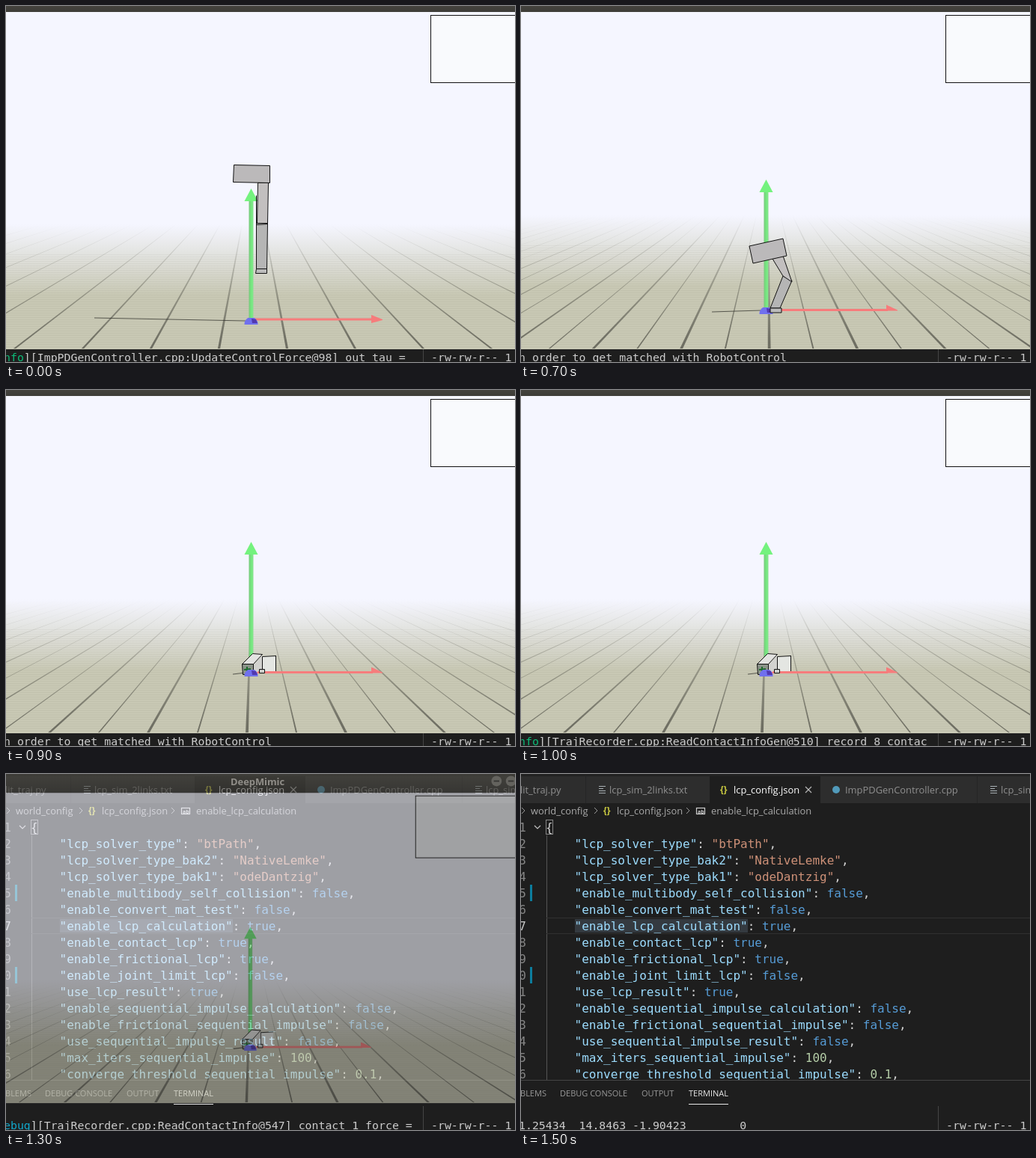
Animation, 680 px wide and 476 px high, one loop 1.6 s. Source, as an HTML page with a canvas:

```html
<!DOCTYPE html>
<html lang="en">
<head>
<meta charset="utf-8">
<style>
html, body { margin: 0; width: 100%; height: 100%; overflow: hidden; background: #1e1e1e }
canvas { display: block }
</style>
</head>
<body>
<canvas id="stage" width="680" height="476"></canvas>
<script>
const c = document.getElementById('stage').getContext('2d');
const MONO = '"DejaVu Sans Mono", monospace', SANS = '"Open Sans", sans-serif';
const CELL = 8.95;

function rect(x, y, w, h, fill) { c.fillStyle = fill; c.fillRect(x, y, w, h); }
function text(s, x, y, fill, font) { c.font = font; c.fillStyle = fill; c.fillText(s, x, y); }
function path(pts, close) {
  c.beginPath();
  for (let i = 0; i < pts.length; i += 2) c.lineTo(pts[i], pts[i + 1]);
  if (close) c.closePath();
}
function poly(fill, ...pts) { path(pts, true); c.fillStyle = fill; c.fill(); }
function line(color, width, ...pts) { path(pts); c.strokeStyle = color; c.lineWidth = width; c.stroke(); }
function solid(fill, ...pts) { poly(fill, ...pts); c.strokeStyle = '#111'; c.lineWidth = 1; c.stroke(); }
function disc(x, y, r, fill) { c.beginPath(); c.arc(x, y, r, 0, 7); c.fillStyle = fill; c.fill(); }
function fade(y0, y1, from, to) {
  const g = c.createLinearGradient(0, y0, 0, y1);
  g.addColorStop(0, from); g.addColorStop(1, to);
  return g;
}

// ---- editor ----
const CONFIG = [
  ['lcp_solver_type', '"btPath"'], ['lcp_solver_type_bak2', '"NativeLemke"'],
  ['lcp_solver_type_bak1', '"odeDantzig"'], ['enable_multibody_self_collision', 'false'],
  ['enable_convert_mat_test', 'false'], ['enable_lcp_calculation', 'true'],
  ['enable_contact_lcp', 'true'], ['enable_frictional_lcp', 'true'],
  ['enable_joint_limit_lcp', 'false'], ['use_lcp_result', 'true'],
  ['enable_sequential_impulse_calculation', 'false'], ['enable_frictional_sequential_impulse', 'false'],
  ['use_sequential_impulse_result', 'false'], ['max_iters_sequential_impulse', '100'],
  ['converge_threshold_sequential_impulse', '0.1']
];
const valueColor = v => v[0] === '"' ? '#ce9178' : /\d/.test(v) ? '#b5cea8' : '#569cd6';

function fileIcon(x, y) {
  for (let i = 0; i < 4; i++) rect(x, y + i * 3, i === 1 ? 6 : 9, 1, '#a8b0b4');
}

function drawEditor() {
  rect(0, 0, 680, 476, '#1e1e1e');
  rect(0, 0, 680, 39, '#2d2d2d');
  rect(0, 0, 680, 3, '#222');
  rect(252, 3, 148, 36, '#1e1e1e');
  for (const x of [86, 609]) rect(x, 3, 1, 36, '#252526');
  const ui = '12.9px ' + SANS, dim = '#8f8f8f';
  text('lit_traj.py', -1, 26, dim, ui);
  fileIcon(104, 16);
  text('lcp_sim_2links.txt', 118, 26, dim, ui);
  text('{}', 266, 25, '#cbcb41', 'bold 12px ' + SANS);
  text('lcp_config.json', 284, 26, '#fff', ui);
  line('#bbb', 1.1, 380, 17, 388, 25);
  line('#bbb', 1.1, 388, 17, 380, 25);
  disc(421, 21, 5, '#519aba');
  text('ImpPDGenController.cpp', 433, 26, dim, ui);
  fileIcon(627, 16);
  text('lcp_sim_2links', 641, 26, dim, ui);

  for (const x of [1, 98, 221]) line('#999', 1, x, 45, x + 4, 49, x, 53);
  text('world_config', 13, 54, '#a9a9a9', ui);
  text('{}', 110, 53, '#cbcb41', 'bold 12px ' + SANS);
  text('lcp_config.json', 128, 54, '#a9a9a9', ui);
  c.strokeStyle = '#ccc'; c.lineWidth = 1.2; c.strokeRect(234.5, 45.5, 11, 8);
  text('ab', 236, 53, '#ccc', 'bold 7px ' + SANS);
  text('enable_lcp_calculation', 254, 54, '#a9a9a9', ui);

  c.save();
  c.beginPath(); c.rect(0, 60, 680, 349); c.clip();
  rect(34, 82, 1, 330, '#555');
  rect(34, 192, 646, 1, '#303030');
  rect(34, 213, 646, 1, '#303030');
  rect(72, 194, 231, 18, '#343a40');
  line('#c5c5c5', 1.1, 18, 69, 22, 73, 26, 69);
  c.strokeStyle = '#888'; c.lineWidth = 1; c.strokeRect(33.5, 61.5, 9, 19);
  const code = '16px ' + MONO;
  text('{', 33, 77, '#d4d4d4', code);
  for (let n = 1; n <= 16; n++) {
    const y = 55 + 22 * n;
    c.textAlign = 'right';
    text(n, 7, y, n === 7 ? '#c6c6c6' : '#858585', code);
    c.textAlign = 'left';
    if (n % 5 === 0 && n < 15) rect(12, y - 17, 3, 22, '#0c7d9d');
    if (n === 1) continue;
    const [key, value] = CONFIG[n - 2];
    let x = 71.5;
    for (const [s, color] of [[`"${key}"`, '#9cdcfe'], [': ', '#d4d4d4'], [value, valueColor(value)], [',', '#d4d4d4']]) {
      text(s, x, y, color, code);
      x += c.measureText(s).width;
    }
  }
  c.restore();

  rect(0, 409, 680, 1, '#444');
  const tab = '11px ' + SANS;
  text('BLEMS', -1, 431, '#999', tab);
  text('DEBUG CONSOLE', 52, 431, '#999', tab);
  text('OUTPUT', 161, 431, '#999', tab);
  text('TERMINAL', 224, 431, '#e7e7e7', tab);
  rect(224, 441, 53, 1, '#e7e7e7');
}

function drawTerminal(output) {
  const font = '14.87px ' + MONO, tag = output.match(/^(nfo|ebug)?/)[0];
  text(tag, -3, 475, tag === 'nfo' ? '#0dbc79' : '#11a8cd', font);
  text(output.slice(tag.length), -3 + tag.length * CELL, 475, '#ccc', font);
  rect(557, 444, 1, 32, '#444');
  text('-rw-rw-r-- 1', 568, 475, '#ccc', font);
}

// ---- simulation window ----
function drawGround(base, high) {
  const top = high ? 292 : 280, vx = 330, vy = 213;
  const step = high ? 91 : 66 - (base - 379) / 4;
  const mid = high ? 375.5 : 322 + (base - 379) / 3;
  rect(-60, 8, 800, 451, '#f5f6ff');
  rect(-60, top, 800, 459 - top, fade(top, top + 95, 'rgba(200,200,180,0)', 'rgb(200,200,180)'));
  c.save();
  c.beginPath(); c.rect(-60, top, 800, 459 - top); c.clip();
  const ink = fade(top, 450, 'rgba(95,95,85,0)', 'rgba(95,95,85,.85)');
  for (let k = -16; k <= 16; k++) {
    const x = mid + k * step, w = high ? 1.6 : k % 2 ? 1 : 1.9;
    poly(ink, vx, vy, x - w, 458, x + w, 458);
  }
  for (let y = top + 40; y < 458; y += 3) rect(-60, y, 800, 1, 'rgba(110,110,90,.06)');
  c.restore();
}

function drawAxes(base, high) {
  const x = base === 391 ? 329 : 327.5, tip = base - (high ? 178 : 176);
  const red = high ? base - 3 : base - 1.5;
  const g = c.createLinearGradient(x - 3, 0, x + 3, 0);
  g.addColorStop(0, '#78c87c'); g.addColorStop(.6, '#74ec80'); g.addColorStop(1, '#8adf90');
  rect(x - 3, tip + 15, 6, 176 - 15, g);
  poly('#74f27e', x, tip, x + 9, tip + 17, x - 9, tip + 17);
  rect(330, red - 1.5, 160, 3, '#f67c7c');
  poly('#f67c7c', 488, red - (high ? 6 : 7), 503, red, 503, red + 1, 488, red + (high ? 5 : 1));
}

function drawOrigin(base) {
  c.save();
  c.beginPath(); c.rect(300, base - 5, 60, 9); c.clip();
  disc(327.5, base + 3, 9, '#7070ee');
  poly('#5138b0', 328, base - 4, 334, base - 3, 336, base + 2, 329, base + 2);
  c.restore();
}

const POSES = {
  stand(dy) {
    c.save();
    c.translate(.5, dy + .5);
    solid('#c2bfbf', 336, 236, 350, 236, 349, 290, 335, 290);
    solid('#b5b5b5', 334, 290, 349, 290, 348, 351, 334, 351);
    solid('#bbb', 334, 351, 348, 351, 348, 357, 333, 357);
    line('#111', 1, 334, 253, 334, 292, 349, 291);
    solid('#bbb9ba', 304, 212, 352, 213, 352, 236, 303, 235);
    c.restore();
  },
  bend() {
    solid('#b5b5b5', 333, 404, 346, 404, 362, 367, 350, 361);
    solid('#c2bfbf', 350, 361, 362, 369, 350, 334, 336, 338);
    solid('#bbb', 333, 404, 348, 404, 348, 410, 333, 410);
    solid('#bbb9ba', 305, 321, 350, 311, 355, 334, 310, 344);
  },
  fold() {
    solid('#e6e6e6', 331, 358, 349, 345, 365, 359, 347, 368);
    solid('#a9a9a9', 347, 368, 365, 359, 363, 367, 344, 381);
    solid('#858585', 313, 376, 315, 368, 333, 357, 343, 370, 334, 387, 325, 391, 314, 382);
    line('#111', 1, 315, 368, 328, 378, 345, 366);
    line('#111', 1, 328, 378, 325, 390);
    line('#111', 1, 349, 361, 338, 384);
    solid('#c4c4c4', 332, 385, 343, 384, 344, 391, 333, 391);
    disc(340.5, 358, 3.5, '#174c22');
    disc(340.5, 358, 1.8, '#4ab95a');
  },
  rest(open) {
    rect(342, 356, 19, 20, '#e4e6e2');
    line('#111', 1, 361, 355.5, 342.5, 356.5, 342.5, 373);
    if (open) line('#111', 1, 360.5, 356, 360.5, 376);
    solid('#e3e3e1', 315.5, 366.5, 329.5, 352.5, 342.5, 353.5, 330.5, 366.5);
    solid('#8b9389', 315.5, 366.5, 330.5, 366.5, 330.5, 380.5, 316.5, 380.5);
    poly('#d2d2cf', 331, 367, 342, 355, 342, 373, 331, 380);
    solid('#cfcfcc', 338.5, 373.5, 345.5, 373.5, 345.5, 378.5, 338.5, 378.5);
    line('#1b6b2b', 2, 318, 374, 327, 373);
    line('#1b6b2b', 2, 322, 370, 322, 378);
  }
};

function drawWindow({ base, pose, arg, shadow }) {
  const high = base === 422;
  drawGround(base, high);
  line('rgba(50,50,45,.75)', 1.2, shadow, base - (high ? 5 : -1), 320, base - 1);
  drawAxes(base, high);
  if (pose === 'rest') { POSES.rest(arg); drawOrigin(base); }
  else { drawOrigin(base); POSES[pose](arg); }
  rect(567, 12, 200, 91, '#111');
  rect(568, 13, 198, 89, '#f9fafd');
  rect(-60, -24, 800, 32, fade(-24, 8, '#55534b', '#3e3d38'));
  c.textAlign = 'center';
  text('DeepMimic', 338, -3, '#dfdbd2', 'bold 14px ' + SANS);
  c.textAlign = 'left';
  for (const x of [685, 706]) {
    disc(x, -9, 7.5, '#8a8880');
    rect(x - 4, -10, 8, 2, '#3c3b37');
  }
}

// ---- timeline ----
const CONTROL = 'nfo][ImpPDGenController.cpp:UpdateControlForce@98] out tau =';
const RECORD = 'nfo][TrajRecorder.cpp:ReadContactInfoGen@510] record 8 contac';
const CONTACT = 'ebug][TrajRecorder.cpp:ReadContactInfo@547] contact 1 force =';
const MATCHED = 'n order to get matched with RobotControl';
const ZEROS = '0 0 0 0 0 0 0 0 0 0 0 0';
const FORCE = '1.25434  14.8463 -1.90423        0';
const rest = (out, open, more) => ({ base: 379, pose: 'rest', arg: open, shadow: 303, out, ...more });
const STEPS = [
  { base: 422, pose: 'stand', arg: 0, shadow: 118, out: CONTROL },
  { base: 422, pose: 'stand', arg: 27, shadow: 150, out: MATCHED },
  { base: 422, pose: 'stand', arg: 58, shadow: 190, out: CONTROL },
  { base: 408, pose: 'bend', shadow: 255, out: MATCHED },
  { base: 391, pose: 'fold', shadow: 295, out: ZEROS },
  rest(MATCHED, true),
  rest(RECORD, true),
  rest(RECORD, false),
  rest(MATCHED, false),
  rest(CONTACT, false, { scale: .92, alpha: .6 }),
  rest(FORCE, false, { scale: .85, alpha: .18 }),
  { out: FORCE }
];

function draw(now) {
  const t = now % 1600;
  const step = STEPS[Math.max(0, Math.floor(t / 100) - 4)];
  drawEditor();
  drawTerminal(step.out);
  if (step.pose) {
    const { scale = 1, alpha = 1 } = step;
    c.save();
    c.translate(314 * (1 - scale), 222 * (1 - scale));
    c.scale(scale, scale);
    if (alpha < 1) drawFaded(step, alpha);
    else drawWindow(step);
    c.restore();
  }
  requestAnimationFrame(draw);
}

// Blend the finished window as one layer by laying the editor back over it.
const layer = document.createElement('canvas');
layer.width = 680; layer.height = 476;
function drawFaded(step, alpha) {
  const l = layer.getContext('2d');
  l.drawImage(c.canvas, 0, 0);
  drawWindow(step);
  c.resetTransform();
  c.globalAlpha = 1 - alpha;
  c.drawImage(layer, 0, 0);
}
requestAnimationFrame(draw);
</script>
</body>
</html>
```
